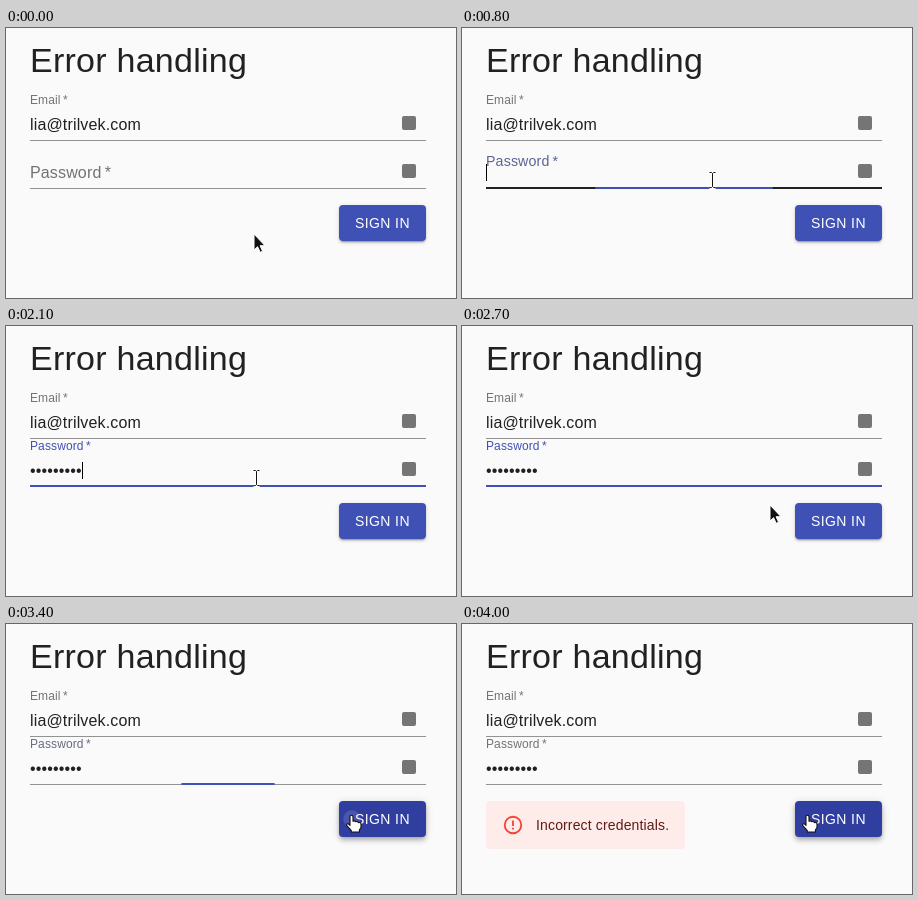
An HTML page for the animation above (5 s loop, 450 px wide and 270 px high).

```html
<!DOCTYPE html>
<html lang="en">
<head>
<meta charset="utf-8">
<title>Error handling</title>
<style>
html, body { margin: 0; width: 100%; height: 100%; overflow: hidden; background: #fafafa; }
#stage {
  position: relative; width: 450px; height: 270px; overflow: hidden;
  font-family: "Liberation Sans", Arial, sans-serif; color: rgba(0,0,0,.87);
}
#stage > * { position: absolute; white-space: pre; }
h1 { left: 24px; top: 11px; margin: 0; font-size: 34px; font-weight: 400; line-height: 42px; letter-spacing: .25px; }
.label { left: 24px; font-size: 16px; line-height: 16px; letter-spacing: .15px; color: rgba(0,0,0,.54); transform-origin: 0 0; }
.value { left: 24px; font-size: 16px; line-height: 19px; letter-spacing: .15px; }
.line { left: 24px; width: 396px; height: 1px; background: rgba(0,0,0,.42); }
.badge { left: 396px; width: 14px; height: 14px; border-radius: 2px; background: #757575; }
#focus { top: 159px; height: 2px; background: #3f51b5; }
#caret { top: 136px; width: 1px; height: 17px; background: #000; }
#button {
  left: 333px; top: 177px; width: 87px; height: 36px; border-radius: 4px; overflow: hidden;
  color: #fff; font-size: 14px; line-height: 36px; letter-spacing: .4px;
}
#button span { position: absolute; left: 16px; top: 0; }
#ripple { position: absolute; left: 13px; top: 18px; border-radius: 50%; background: #fff; transform: translate(-50%, -50%); }
#alert {
  left: 24px; top: 177px; width: 199px; height: 48px; border-radius: 4px;
  background: #fdecea; color: #611a15; font-size: 14px; line-height: 20px; letter-spacing: .15px;
}
#alert svg { position: absolute; left: 16px; top: 13px; }
#alert span { position: absolute; left: 50px; top: 14px; }
#pointers { left: 0; top: 0; }
</style>
</head>
<body>
<div id="stage">
  <h1>Error handling</h1>
  <div class="label" style="top:65px;transform:translateY(1.5px) scale(.75)">Email&thinsp;*</div>
  <div class="value" style="top:87px">lia@trilvek.com</div>
  <div class="line" style="top:112px"></div>
  <div class="badge" style="top:88px"></div>

  <div class="label" id="label" style="top:113px">Password&thinsp;*</div>
  <div class="value" id="dots" style="top:135px"></div>
  <div class="line" id="line"></div>
  <div class="line" id="focus"></div>
  <div class="badge" style="top:136px"></div>
  <div id="caret"></div>

  <div id="alert">
    <svg width="22" height="22" viewBox="0 0 24 24">
      <circle cx="12" cy="12" r="9" fill="none" stroke="#f44336" stroke-width="2"/>
      <path d="M11 7h2v6h-2zM11 15h2v2h-2z" fill="#f44336"/>
    </svg>
    <span>Incorrect credentials.</span>
  </div>
  <div id="button"><span>SIGN IN</span><div id="ripple"></div></div>

  <svg id="pointers" width="450" height="270">
    <path id="arrow" d="M0 0V16L3.6 12.7L6.2 18.3L8.6 17.2L6.1 11.7H11Z"
      fill="#111" stroke="#fff" stroke-width="1"/>
    <g id="beam" fill="none">
      <path d="M-3 -7.5H-1L0 -6.5L1 -7.5H3M0 -6.5V6.5M-3 7.5H-1L0 6.5L1 7.5H3" stroke="#fff" stroke-width="3"/>
      <path d="M-3 -7.5H-1L0 -6.5L1 -7.5H3M0 -6.5V6.5M-3 7.5H-1L0 6.5L1 7.5H3" stroke="#111" stroke-width="1"/>
    </g>
    <path id="hand" d="M-2 1Q-2 -.7 -.5 -.7Q1 -.7 1 1V5.2Q2.8 4.2 3.8 5.8Q5.6 5 6.4 6.6Q9 6 9 8.6V11.5L7.4 14V16H-.8V14.4L-5.4 9.4Q-5.4 7.2 -3.4 8L-2 9.3Z"
      fill="#fff" stroke="#111" stroke-width="1.1" stroke-linejoin="round"/>
  </svg>
</div>
<script>
const LOOP = 5000, STEP = 100;
const HOVER_FIELD = 600, FOCUS = 766, BLUR = 3318;
const HOVER_BUTTON = 2760, PRESS = 3297, RELEASE = 3400, ERROR = 3500;

// time, x, y, pointer shape
const path = [
  [0, 248, 206, "arrow"], [300, 248, 203, "arrow"], [400, 249, 190, "arrow"],
  [500, 250, 173, "arrow"], [600, 250.5, 158, "beam"], [700, 250.5, 152.5, "beam"],
  [800, 250.5, 152, "beam"], [2300, 251.5, 153, "beam"],
  [2500, 257.5, 156, "beam"], [2600, 277, 165, "arrow"], [2700, 308, 179, "arrow"],
  [2800, 337, 189, "hand"], [2900, 345, 192, "hand"], [3000, 346, 192, "hand"]
];
// time, characters typed
const typing = [
  [0, 0], [1300, 1], [1400, 2], [1500, 3], [1700, 4], [1800, 6], [2000, 7], [2100, 9]
];

const $ = id => document.getElementById(id);
const mix = (a, b, p) => a + (b - a) * p;
const mixAll = (a, b, p) => a.map((v, i) => mix(v, b[i], p));
const rgb = c => `rgb(${c.map(Math.round)})`;
const at = (table, t) => table.filter(row => row[0] <= t).pop();
const show = (el, on) => el.style.visibility = on ? "visible" : "hidden";

function bezier(x1, y1, x2, y2) {
  const curve = (a, b, s) => 3 * (1 - s) * (1 - s) * s * a + 3 * (1 - s) * s * s * b + s * s * s;
  return x => {
    if (x <= 0) return 0;
    if (x >= 1) return 1;
    let lo = 0, hi = 1;
    for (let i = 0; i < 24; i++) {
      const mid = (lo + hi) / 2;
      if (curve(x1, x2, mid) < x) lo = mid; else hi = mid;
    }
    return curve(y1, y2, lo);
  };
}
const easeOut = bezier(0, 0, .2, 1);
const easeInOut = bezier(.4, 0, .2, 1);

function shadow(p) {
  const layer = (a, b, alpha) => {
    const [y, blur, spread] = mixAll(a, b, p);
    return `0 ${y}px ${blur}px ${spread}px rgba(0,0,0,${alpha})`;
  };
  return [
    layer([3, 1, -2], [2, 4, -1], .2),
    layer([2, 2, 0], [4, 5, 0], .14),
    layer([1, 5, 0], [1, 10, 0], .12)
  ].join();
}

function drawField(t) {
  const focusIn = easeOut((t - FOCUS) / 200);
  const focusOut = easeOut((t - BLUR) / 200);
  const focus = focusIn * (1 - focusOut);
  const label = $("label").style;
  label.transform = `translateY(${mix(24, 1.5, focusIn)}px) scale(${mix(1, .75, focusIn)})`;
  label.color = rgb(mixAll([115, 115, 115], [63, 81, 181], focus));

  const hover = t >= HOVER_FIELD && t < 2600;
  const line = $("line").style;
  line.top = hover ? "159px" : "160px";
  line.height = hover ? "2px" : "1px";
  line.background = `rgba(0,0,0,${hover ? .87 : .42})`;
  $("focus").style.transform = `scaleX(${focus})`;

  const count = at(typing, t)[1];
  $("dots").textContent = "\u2022".repeat(count);
  $("caret").style.left = Math.round(24 + count * 5.75) + "px";
  show($("caret"), t >= FOCUS && t < BLUR && !(t >= 2700 && t < 3300));
}

function drawButton(t) {
  const hover = easeInOut((t - HOVER_BUTTON) / 250);
  const button = $("button").style;
  button.backgroundColor = rgb(mixAll([63, 81, 181], [48, 63, 159], hover));
  button.boxShadow = shadow(hover);

  const grow = easeInOut((t - PRESS) / 550);
  const fade = easeInOut((t - RELEASE) / 550);
  const ripple = $("ripple").style;
  ripple.width = ripple.height = 154 * grow + "px";
  ripple.opacity = mix(.1, .3, grow) * (1 - fade);
}

function drawPointer(t) {
  const [, x, y, shape] = at(path, t);
  for (const id of ["arrow", "beam", "hand"]) show($(id), id === shape);
  $(shape).setAttribute("transform", `translate(${x} ${y})`);
}

function draw(t) {
  drawField(t);
  drawButton(t);
  drawPointer(t);
  show($("alert"), t >= ERROR);
}

const start = performance.now();
function tick() {
  const elapsed = (performance.now() - start) % LOOP;
  draw(Math.floor(elapsed / STEP) * STEP);
  requestAnimationFrame(tick);
}
tick();
</script>
</body>
</html>
```
